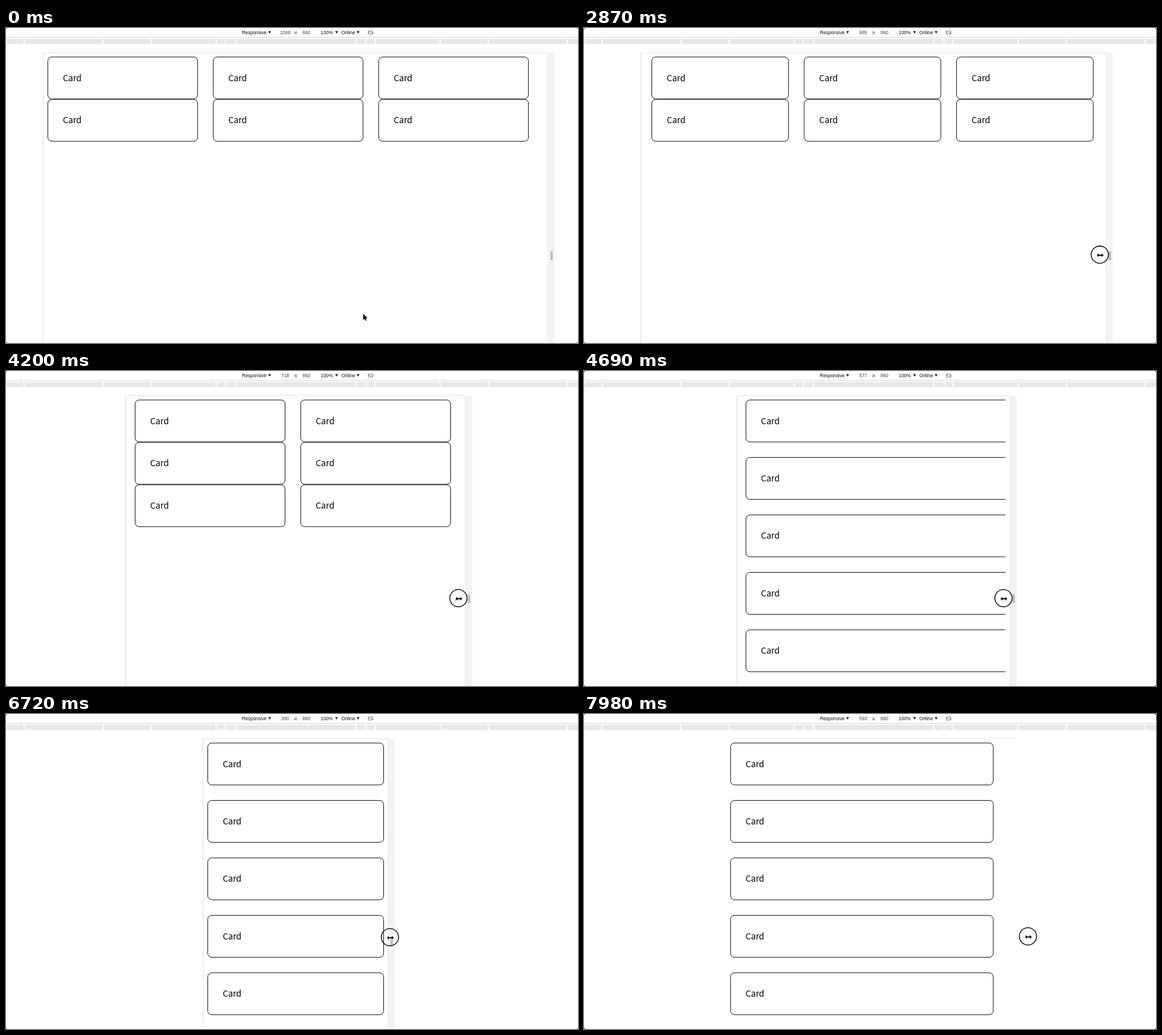
An HTML page with a canvas for the animation above (8000 ms loop, 1008 by 556 pixels).

```html
<!DOCTYPE html>
<html lang="en">
<head>
<meta charset="utf-8">
<title>Responsive card grid</title>
<style>
html, body { margin: 0; width: 100%; height: 100%; overflow: hidden; background: #fff; }
canvas { display: block; }
</style>
</head>
<body>
<canvas id="stage" width="1008" height="556"></canvas>
<script>
const ctx = document.getElementById('stage').getContext('2d');
const LOOP = 8000, STEP = 70, PRESS = 2100;
const SCALE = 0.8313, CENTER = 510.5, TOP = 44;
const PAD = 8 * SCALE, GAP = 32 * SCALE, CARD_H = 90 * SCALE;

// [time, viewport width]
const WIDTH = [
  [2240, 1068], [2800, 985], [2870, 958], [3570, 798], [4130, 718], [4620, 577], [4900, 504],
  [5740, 390], [6720, 390], [7840, 574], [7910, 593], [7980, 624]
];
// [time, x, y] of the free pointer
const FREE = [[0, 629.5, 504.5], [350, 984, 534], [420, 945, 535], [1540, 939, 534], [PRESS, 959, 400]];
// [time, distance from the page's right edge, y] of the dragging pointer
const DRAG = [[PRESS, 4, 399], [3570, -3, 401], [5740, -4, 401], [6370, 4, 394], [7420, 4, 394], [7980, 12.5, 392.5]];

function sample(keys, t, i) {
  const k = keys.findIndex(key => key[0] > t);
  if (k === 0) return keys[0][i];
  if (k < 0) return keys[keys.length - 1][i];
  const a = keys[k - 1], b = keys[k];
  return a[i] + (b[i] - a[i]) * (t - a[0]) / (b[0] - a[0]);
}

const widthAt = t => sample(WIDTH, t, 1);
const leftOf = w => CENTER - w * SCALE / 2;
const rightOf = w => CENTER + w * SCALE / 2;

function rect(x, y, w, h, color) {
  ctx.fillStyle = color;
  ctx.fillRect(x, y, w, h);
}

function shape(points, fill, outline) {
  ctx.beginPath();
  points.forEach(([x, y]) => ctx.lineTo(x, y));
  ctx.closePath();
  if (outline) {
    ctx.strokeStyle = outline;
    ctx.lineWidth = 2;
    ctx.lineJoin = 'round';
    ctx.stroke();
  }
  ctx.fillStyle = fill;
  ctx.fill();
}

function label(text, x, color, align = 'left') {
  ctx.font = '8.33px "Liberation Sans", Arial, sans-serif';
  ctx.textAlign = align;
  ctx.fillStyle = color;
  ctx.fillText(text, x, 11);
}

function rotateIcon(x, y) {
  ctx.save();
  ctx.translate(x, y);
  ctx.rotate(-Math.PI / 4);
  ctx.strokeStyle = '#555';
  ctx.lineWidth = 0.9;
  ctx.strokeRect(-1.6, -3, 3.2, 6);
  for (const a of [-0.5, Math.PI - 0.5]) {
    ctx.beginPath();
    ctx.arc(0, 0, 4.3, a, a + 2);
    ctx.stroke();
  }
  ctx.restore();
}

function toolbar(width) {
  label('Responsive', 415.7, '#111');
  label(Math.round(width), 492, '#444', 'center');
  label('860', 529.5, '#444', 'center');
  label('100%', 554.5, '#111');
  label('Online', 591, '#111');
  for (const x of [464.5, 582.5, 620.5]) shape([[x - 2.5, 5.5], [x + 2.5, 5.5], [x, 10]], '#222');

  ctx.strokeStyle = '#333';
  ctx.lineWidth = 1;
  ctx.beginPath();
  for (const d of [2.4, -2.4]) {
    ctx.moveTo(CENTER - d, 6.2);
    ctx.lineTo(CENTER + d, 11);
  }
  ctx.stroke();
  rotateIcon(642.5, 8);

  // ruler with breakpoints mirrored about the centre
  rect(0, 16, 1008, 1, '#cfcfcf');
  rect(1, 19, 1007, 9.5, '#e8e8e8');
  for (const d of [106, 124, 140, 254.5, 339.5, 478.5]) {
    rect(CENTER - d - 1, 19, 2, 10, '#fff');
    rect(CENTER + d - 1, 19, 2, 10, '#fff');
  }
}

function frame(width) {
  const left = leftOf(width), right = rightOf(width);
  rect(left - 1, TOP - 1, right - left + 2, 1, '#e4e4e4');
  rect(left - 2.5, TOP, 2, 556, '#f5f5f5');
  rect(left - 1, TOP, 1, 556, '#e2e2e2');
  rect(right, TOP, 12.5, 556, '#f3f3f3');
  rect(right, TOP, 1, 556, '#e6e6e6');
  for (const x of [5.5, 7.5]) rect(right + x, 394, 1, 16, '#888');
}

function page(real, laidOut) {
  const left = leftOf(real);
  ctx.save();
  ctx.beginPath();
  ctx.rect(left, TOP, real * SCALE, 556);
  ctx.clip();
  rect(left, TOP, real * SCALE, 556, '#fff');

  const cols = laidOut >= 960 ? 3 : laidOut >= 640 ? 2 : 1;
  const inner = laidOut * SCALE - 2 * PAD;
  const cardW = cols > 1 ? inner / cols - GAP : inner;
  const pitch = CARD_H + (cols > 1 ? 0 : GAP);
  ctx.font = '15px "Noto Sans CJK JP", "Noto Sans", sans-serif';
  ctx.textAlign = 'left';
  ctx.strokeStyle = ctx.fillStyle = '#000';
  ctx.lineWidth = 1;
  for (let i = 0; i < 6; i++) {
    const x = left + PAD + (i % cols) * (cardW + GAP);
    const y = TOP + PAD + Math.floor(i / cols) * pitch;
    ctx.beginPath();
    ctx.roundRect(x + 0.5, y + 0.5, cardW - 1, CARD_H - 0.8, 7);
    ctx.stroke();
    ctx.fillText('Card', x + GAP + 0.3, y + 43);
  }
  ctx.restore();
}

function arrow(x, y) {
  shape([[0, 0], [0, 11], [2.5, 8.7], [4.2, 12.3], [6, 11.5], [4.4, 8], [7.6, 7.7]]
    .map(([a, b]) => [x + a, y + b]), '#000', '#fff');
}

function resize(x, y) {
  const half = [[-6, 0], [-2.6, -3.4], [-2.6, -1], [2.6, -1], [2.6, -3.4]];
  const all = half.concat(half.map(([a, b]) => [-a, -b]));
  shape(all.map(([a, b]) => [x + a, y + b]), '#000', '#fff');
}

function pointer(t, real) {
  if (t < PRESS) {
    const draw = t < 350 ? arrow : resize;
    draw(sample(FREE, t, 1), sample(FREE, t, 2));
    return;
  }
  const x = rightOf(real) + sample(DRAG, t, 1), y = sample(DRAG, t, 2);
  ctx.strokeStyle = '#111';
  ctx.lineWidth = 1.6;
  ctx.beginPath();
  ctx.arc(x, y, 15.2, 0, 7);
  ctx.stroke();
  resize(x + 0.7, y + 1);
}

function corners() {
  for (const [x, dx] of [[0, 2], [1008, -2]]) {
    for (const [y, dy] of [[0, 2], [556, -2]]) shape([[x, y], [x + dx, y], [x, y + dy]], '#333');
  }
}

function draw(now) {
  const t = Math.floor(now % LOOP / STEP) * STEP;
  // the frame and the page layout trail the dragged width
  const real = widthAt(t), shown = widthAt(t - STEP);
  rect(0, 0, 1008, 556, '#fff');
  toolbar(shown);
  frame(shown);
  page(real, Math.min(shown, widthAt(t - 2 * STEP)));
  pointer(t, real);
  corners();
  requestAnimationFrame(draw);
}

requestAnimationFrame(draw);
</script>
</body>
</html>
```
